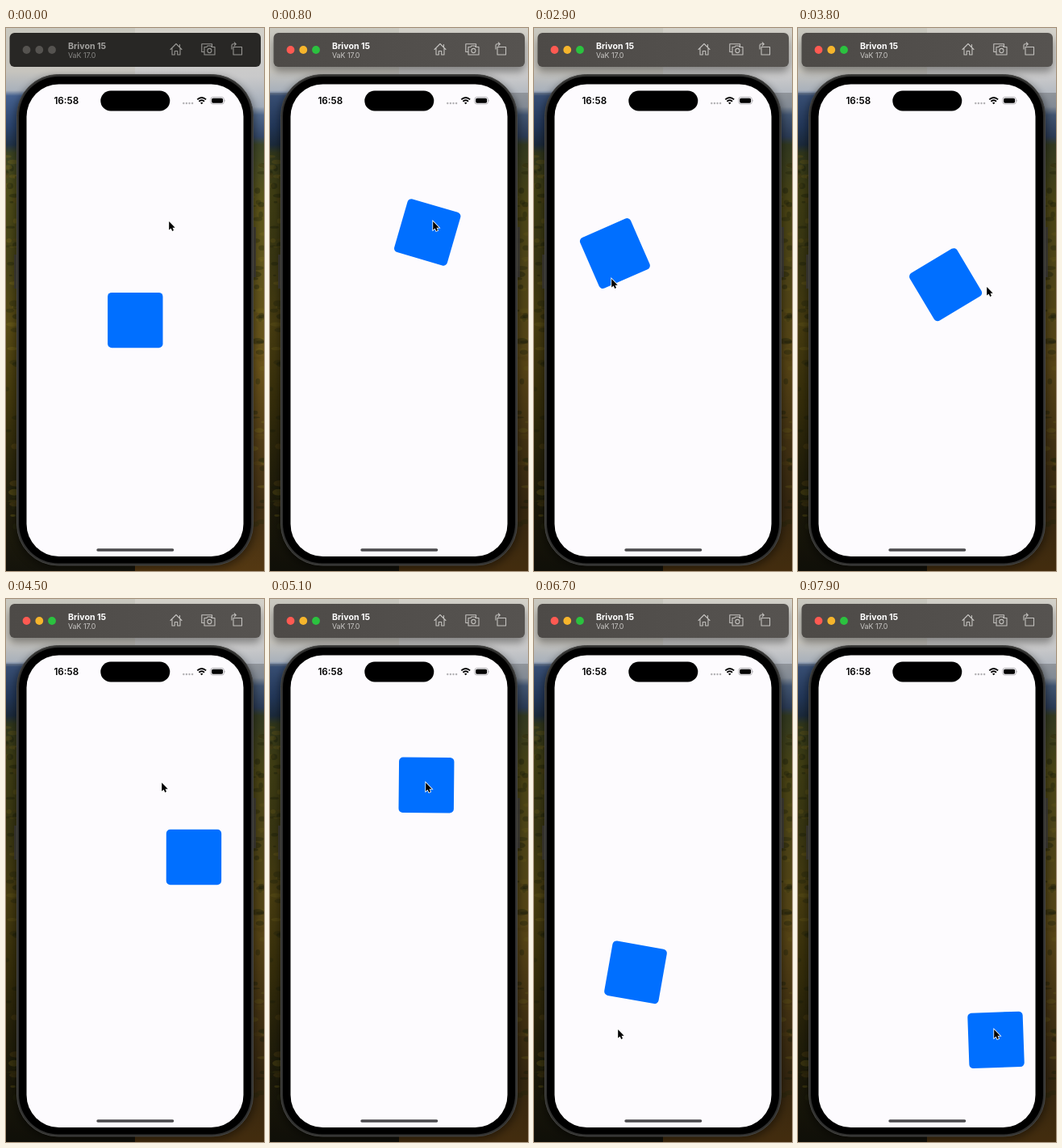
An HTML page that plays this animation: 320 px wide and 671 px high, repeating every 8000 ms.

```html
<!DOCTYPE html>
<html lang="en">
<head>
<meta charset="utf-8">
<title>Snap to tap</title>
<style>
  html, body { margin: 0; width: 100%; height: 100%; overflow: hidden; background: #14140c; }
  svg { display: block; width: 100vw; height: 100vh; }
  text { font-family: Inter, "Liberation Sans", sans-serif; }
  #bar { fill: #282725; }
  #title { fill: #a2a19f; }
  #sub { fill: #8b8a88; }
  #lights circle { fill: #555350; }
  #icons { fill: none; stroke: #969592; stroke-width: 1.1; stroke-linejoin: round; stroke-linecap: round; }
  #shade { opacity: 0; }
  .active #bar { fill: url(#barFill); }
  .active #title { fill: #fff; }
  .active #sub { fill: #cccac8; }
  .active #lights .red { fill: #fe5a52; }
  .active #lights .amber { fill: #f6b52c; }
  .active #lights .green { fill: #2bc23f; }
  .active #icons { stroke: #c3c1be; }
  .active #shade { opacity: 1; }
</style>
</head>
<body>
<svg id="stage" viewBox="0 0 320 671" preserveAspectRatio="none">
  <defs>
    <linearGradient id="left" x2="0" y2="1">
      <stop offset="0" stop-color="#c9c8bf"/><stop offset=".08" stop-color="#c6c4be"/>
      <stop offset=".115" stop-color="#a9b1bb"/><stop offset=".125" stop-color="#45618f"/>
      <stop offset=".18" stop-color="#2b456f"/><stop offset=".215" stop-color="#22344a"/>
      <stop offset=".23" stop-color="#3b4322"/><stop offset=".3" stop-color="#4e4c18"/>
      <stop offset=".42" stop-color="#454216"/><stop offset=".55" stop-color="#574a14"/>
      <stop offset=".68" stop-color="#43390d"/><stop offset=".82" stop-color="#29250c"/>
      <stop offset="1" stop-color="#14130b"/>
    </linearGradient>
    <linearGradient id="right" x2="0" y2="1">
      <stop offset="0" stop-color="#d3d1c9"/><stop offset=".09" stop-color="#c9c9ca"/>
      <stop offset=".145" stop-color="#a3adba"/><stop offset=".16" stop-color="#526a8d"/>
      <stop offset=".2" stop-color="#35496a"/><stop offset=".215" stop-color="#3f4828"/>
      <stop offset=".32" stop-color="#5c551a"/><stop offset=".45" stop-color="#62561d"/>
      <stop offset=".62" stop-color="#6c551b"/><stop offset=".75" stop-color="#543f17"/>
      <stop offset=".88" stop-color="#423014"/><stop offset="1" stop-color="#543812"/>
    </linearGradient>
    <linearGradient id="barFill" x2="1" y2="0">
      <stop offset="0" stop-color="#4d4a47"/><stop offset="1" stop-color="#565350"/>
    </linearGradient>
    <filter id="soft" x="-20%" y="-20%" width="140%" height="140%"><feGaussianBlur stdDeviation="5"/></filter>
    <filter id="blur"><feGaussianBlur stdDeviation=".7"/></filter>
  </defs>

  <rect width="160" height="671" fill="url(#left)"/>
  <rect x="160" width="160" height="671" fill="url(#right)"/>
  <g id="hills" filter="url(#blur)"></g>
  <g id="shade">
    <rect y="80" width="320" height="591" opacity=".2"/>
    <rect x="4" y="12" width="312" height="42" rx="8" opacity=".35" filter="url(#soft)"/>
  </g>
  <rect x="11" y="60" width="298" height="608" rx="52" opacity=".4" filter="url(#soft)"/>

  <rect id="bar" x="4.5" y="6" width="311.5" height="42" rx="6"/>
  <g id="lights">
    <circle class="red" cx="25.5" cy="27" r="4.9"/>
    <circle class="amber" cx="41.3" cy="27" r="4.9"/>
    <circle class="green" cx="57" cy="27" r="4.9"/>
  </g>
  <text id="title" x="77" y="25.5" font-size="10.6" font-weight="700">Brivon 15</text>
  <text id="sub" x="77" y="37" font-size="8.8">VaK 17.0</text>
  <g id="icons">
    <path d="M204 26.5 211 19.5 218 26.5M206 25V33H209.3V28.5H212.7V33H216V25M215.5 23.5V20.5"/>
    <path d="M245.5 29.5H242.8V19.8H255.5V22.5M246 23.5H249L250 22H254L255 23.5H259V33H246Z"/>
    <circle cx="252.4" cy="28" r="2.6"/>
    <path d="M282 23.5H292.5V33H282ZM280 26V21.5Q280 19.8 282 19.8H285M283.2 17.8 285.3 19.8 283.2 21.8"/>
  </g>

  <path d="M11.5 280V322M308.5 246V308" stroke="#34322f" stroke-width="2.5"/>
  <rect x="13.5" y="57.5" width="293" height="606.5" rx="51" fill="#30302f" stroke="#454543"/>
  <rect x="16" y="60" width="288" height="601.5" rx="49"/>
  <rect x="25.5" y="69.5" width="269" height="583.5" rx="40" fill="#fdfbfe"/>
  <rect x="117.3" y="77.5" width="86" height="25" rx="12.5"/>
  <text x="59.4" y="94" font-size="11.7" font-weight="600">16:58</text>
  <g fill="#b3b2b5">
    <circle cx="220.3" cy="93" r="1.2"/><circle cx="223.9" cy="93" r="1.2"/>
    <circle cx="227.5" cy="93" r="1.2"/><circle cx="231.1" cy="93" r="1.2"/>
  </g>
  <g fill="none" stroke="#000" stroke-width="1.9">
    <path d="M237.3 88.4Q242.7 83.6 248.1 88.4M239.4 90.8Q242.7 87.8 246 90.8"/>
  </g>
  <path d="M241 92.5Q242.7 91 244.4 92.5L242.7 94.3Z"/>
  <rect x="253.8" y="85.4" width="16.6" height="8.6" rx="2.8" fill="none" stroke="#a4a3a6" stroke-width=".8"/>
  <rect x="255.1" y="86.7" width="14" height="6" rx="1.7"/>
  <path d="M271.4 88.2Q272.9 89.7 271.4 91.2Z" fill="#a4a3a6"/>

  <rect id="square" x="-34.2" y="-34.2" width="68.4" height="68.4" rx="5" fill="#006fff"/>
  <rect x="112.3" y="643.2" width="96" height="3.6" rx="1.8" fill="#4b4a4d"/>
  <path id="cursor" d="M1.2 .9V11.6L3.7 9.4 5.2 12.9 7 12.1 5.5 8.7H8.7Z" stroke="#fff" stroke-width="1.6" paint-order="stroke"/>
</svg>
<script>
const LOOP = 8000;
const $ = id => document.getElementById(id);

// Each tap: time, cursor tip, resting centre, strength of the twist.
const taps = [
  { at: 500, tip: [201, 238], to: [200.2, 237], twist: 115 },
  { at: 1670, tip: [113, 206], to: [112.6, 198], twist: -93 },
  { at: 2700, tip: [95, 309], to: [95, 314], twist: -80 },
  { at: 3620, tip: [233, 319], to: [233, 319], twist: -96 },
  { at: 4600, tip: [192, 226], to: [193.3, 228.4], twist: -30 },
  { at: 6475, tip: [103, 531], to: [104, 537.5], twist: 39 },
  { at: 7400, tip: [242, 531], to: [248, 545], twist: 114 }
];

const mix = (a, b, k) => a.map((v, i) => v + (b[i] - v) * k);
const smooth = k => (k = Math.min(1, Math.max(0, k)), k * k * (3 - 2 * k));
const snap = s => 1 - Math.exp(-12 * s) * (1 + 12 * s);
const wobble = s => Math.exp(-6 * s) * Math.sin(7 * s);

function paintHills() {
  let seed = 7;
  const rand = () => (seed = seed * 16807 % 2147483647) / 2147483647;
  const tones = ['#1d220d', '#76671f', '#2a2c0e', '#5f4b17'];
  let shapes = '';
  for (let i = 0; i < 110; i++) {
    const x = (i % 2 ? 306 : 0) + rand() * 14;
    const y = 158 + rand() * 470;
    shapes += `<ellipse cx="${x}" cy="${y}" rx="${2 + rand() * 6}" ry="${1 + rand() * 3}" fill="${tones[i * 3 % 7 % 4]}" opacity=".4"/>`;
  }
  $('hills').innerHTML = shapes;
}

function draw(now) {
  const t = now % LOOP;
  let centre = [160.3, 361.1], tip = taps[0].tip, angle = 0;
  for (const tap of taps) {
    tip = mix(tip, tap.tip, smooth((t - tap.at + 700) / 600));
    const s = (t - tap.at) / 1000;
    if (s < 0) continue;
    centre = mix(centre, tap.to, snap(s));
    angle = tap.twist * wobble(s);
  }
  $('square').setAttribute('transform', `translate(${centre}) rotate(${angle})`);
  $('cursor').setAttribute('transform', `translate(${tip})`);
  $('stage').classList.toggle('active', t >= taps[0].at);
}

paintHills();
const start = performance.now();
function tick() {
  draw(performance.now() - start);
  requestAnimationFrame(tick);
}
tick();
</script>
</body>
</html>
```
